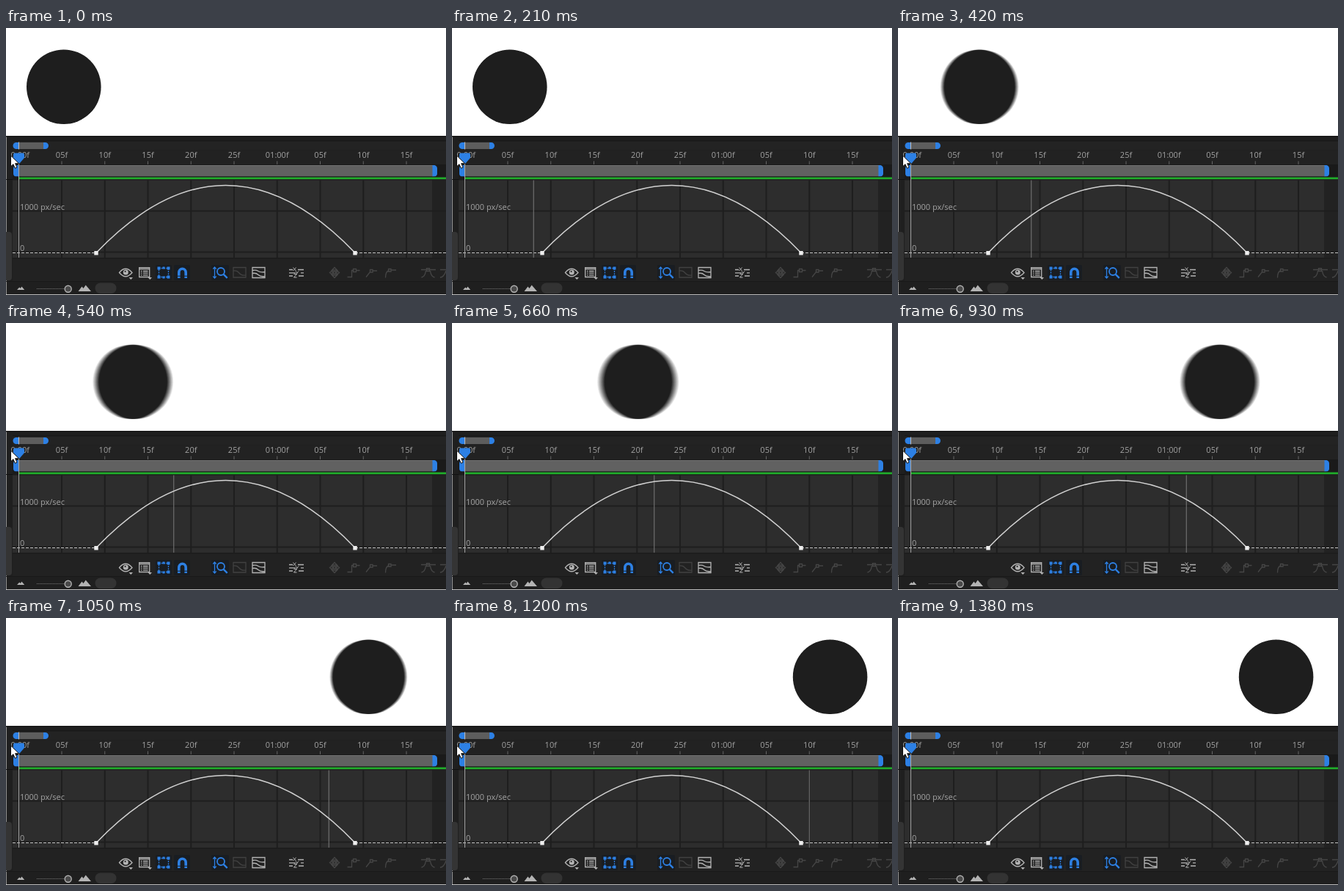
These frames come from a looping animation (600x364 px, 1.44 s). An HTML page with a canvas:

```html
<!DOCTYPE html>
<html lang="en">
<head>
<meta charset="utf-8">
<title>Speed graph</title>
<style>
html, body { margin: 0; width: 100%; height: 100%; overflow: hidden; background: #fff; }
canvas, svg { position: absolute; left: 0; top: 0; display: block; }
text { font: 11px "Open Sans", "Noto Sans", sans-serif; fill: #a3a3a3; }
.line { fill: none; stroke: #b4b4b4; stroke-width: 1.3; }
.blue { fill: #2d80e4; }
.on { stroke: #2d80e4; }
.dim { stroke: #414141; }
.btn { fill: #191d22; }
</style>
</head>
<body>
<canvas id="ball" width="600" height="147"></canvas>
<svg width="600" height="364" viewBox="0 0 600 364">
  <rect x=".5" y="147" width="600" height="216.3" fill="#1f1f1f"/>
  <rect y="147" width="600" height="1.5" fill="#171717"/>
  <rect x="9" y="153" width="591" height="1.5" fill="#181818"/>
  <rect x="9" y="154.5" width="591" height="12" fill="#232323"/>

  <!-- navigator -->
  <rect x="16" y="156" width="36" height="9" fill="#5d5d5d"/>
  <path class="blue" d="M17 156v9h-3a4.5 4.5 0 0 1 0-9zM51 156v9h2.5a4.5 4.5 0 0 0 0-9z"/>
  <path d="M17.5 155.500v10" stroke="#bbb"/>

  <!-- ruler and work area -->
  <rect x="9" y="166.500" width="591" height="20" fill="#222"/>
  <g id="ruler"></g>
  <rect x="9" y="186" width="591" height="17.500" fill="#1a1a1a"/>
  <rect x="16" y="187" width="567" height="15.500" fill="#616161"/>
  <path d="M17 187.500h565" stroke="#727272"/>
  <path class="blue" d="M17 187v15.500h-4q-3-1-3-4v-7q0-3.500 3-4.500zM581.500 187v15.500h3q3.500-1 3.500-4v-7q0-3.500-3.500-4.500z"/>
  <rect x="9" y="202.500" width="591" height="5" fill="#1b1b1b"/>
  <rect x="17" y="203.500" width="583" height="2.700" fill="#20ad2b"/>

  <!-- graph -->
  <rect x="9" y="207.500" width="572" height="106" fill="#2d2d2d"/>
  <rect x="581" y="207.500" width="19" height="106" fill="#222"/>
  <path id="grid" stroke="#1e1e1e" stroke-width="2"/>
  <text x="19" y="247.500">1000 px/sec</text>
  <text x="19" y="303.500">0</text>
  <path d="M9 306.500H123M476 306.500H600" stroke="#c4c4c4" stroke-width="1.100" stroke-dasharray="4 2"/>
  <path id="head" d="M0 207.500V313.500" stroke="#747474" stroke-width="1.100"/>
  <path d="M123 306.500Q299.500 122.500 476 306.500" fill="none" stroke="#d2d2d2" stroke-width="1.500"/>
  <path d="M120.300 304h5.400v5.400h-5.400zM473.300 304h5.400v5.400h-5.400z" fill="#eee"/>
  <path d="M17.500 185V313.500" stroke="#a8a8a8"/>
  <path class="blue" d="M12 170.500h11q2 0 2 2v4.500l-6 7q-1.500 1.500-3 0l-6-7v-4.500q0-2 2-2z"/>
  <path d="M6.500 174v14.800l3.400-3.100 2.400 5.500 2.700-1.200-2.400-5.300h4.900z" fill="#fff" stroke="#111" stroke-width="1"/>
  <path d="M0 206.500H9" stroke="#111"/>
  <path d="M0 278h4q4 0 4 4v58q0 4-4 4h-4z" fill="#343434"/>

  <!-- toolbar -->
  <rect x="9" y="313.500" width="591" height="31.500" fill="#222"/>
  <path d="M9 314H600M0 345.500H600" stroke="#191919"/>
  <path d="M154.500 333.500q8.500-10.500 17.500 0q-9 10.500-17.500 0z" class="line" stroke-width="1.600"/>
  <circle cx="163.300" cy="333" r="3.500" fill="#b4b4b4"/>
  <circle cx="162.600" cy="332" r="1.100" fill="#222"/>
  <path d="M167.500 340h5.500l-2.750 3zM193.500 340h5.500l-2.750 3z" fill="#b4b4b4"/>
  <path class="line" d="M181.700 326.700h14v12.800h-14zM181.700 328.500h14"/>
  <path class="line" d="M184 331.500h1.500M187 331.500h6.500M184 334.200h1.500M187 334.200h6.500M184 336.900h1.500M187 336.900h6.500"/>

  <rect class="btn" x="204" y="323" width="22" height="21" rx="2"/>
  <path class="line on" d="M208.500 327.500h13v12h-13z" stroke-dasharray="2 1.300"/>
  <path class="blue" d="M206.500 325.500h4v4h-4zM219.500 325.500h4v4h-4zM206.500 337.500h4v4h-4zM219.500 337.500h4v4h-4zM213.500 325.500h3v3h-3zM213.500 338.500h3v3h-3z"/>
  <rect class="btn" x="229" y="323" width="22" height="21" rx="2"/>
  <path class="line on" style="stroke-width:3.600" d="M235.800 341v-7.500a4.700 5.200 0 0 1 9.400 0v7.500"/>
  <path d="M233 338.200h5.500M242.500 338.200h5.500" stroke="#191d22"/>

  <rect class="btn" x="280" y="323" width="24" height="21" rx="2"/>
  <path class="line on" d="M284.500 326v15M282.300 328.500l2.200-2.500 2.200 2.500M282.300 338.500l2.200 2.500 2.200-2.500"/>
  <circle class="line on" style="stroke-width:1.800" cx="293" cy="332" r="5"/>
  <path class="line on" style="stroke-width:2.400" d="M296.700 335.800l5 5"/>
  <path class="line dim" d="M310 326.500h17v13.500h-17zM310 331q5-1 8 3t9 3"/>
  <path class="line" d="M336 326.500h17v14h-17zM336 330.500q5-1 8 1t9 1M336 334.500q5-1 8 2t9 2"/>
  <path class="line" d="M386 329.500h5M398 329.500h8M386 333.800h9M402 333.800h4M386 338h5M399 338h7"/>
  <path class="line" style="stroke-width:1" d="M391.500 326.500l4 4.500M395.500 326.500l-4 4.500M395 331.500l2 2.500 2-2.500M397 334l-1.500 2M392.500 335.500h4l-4 4.500h4"/>

  <g class="line dim" style="stroke:#464646">
    <path d="M448 326.500l3.500 3.500h-7zM448 340.500l3.500-3.500h-7zM441.500 333.500l3.500-3v6zM454.500 333.500l-3.500-3v6zM446.500 332h3v3h-3z"/>
    <path d="M465.500 339.500h6v-9h3M473.500 328.500h4v4h-4zM477.500 330.500h5"/>
    <path d="M491 339.500l6-7.500M496.500 329.500h3.500v3.500h-3.500zM500 331h6"/>
    <path d="M517.500 340.500q0-9 5-10M521.500 328.500h3.500v3.500h-3.500zM525 330h7"/>
    <path d="M566.500 340q5-1 6-9M584.500 340q-5-1-6-9M566 329.500h20M573.500 327.700h4v4h-4z"/>
    <path d="M592 340q5 0 8-9M592 329.500h8"/>
  </g>

  <!-- zoom strip -->
  <path d="M15 357l3.300-3.600 1.500 1.500 1.600-2.400 3.800 4.500zM98.500 359l5-6.500 2 2.500 3.200-4.500 7.300 8.500z" fill="#b4b4b4"/>
  <path d="M42 355.500H80" stroke="#777" stroke-dasharray="1 1"/>
  <circle cx="84.700" cy="355.800" r="4.500" fill="#4a4a4a" stroke="#b4b4b4" stroke-width="1.400"/>
  <rect x="121.500" y="347.500" width="29" height="14.500" rx="7.200" fill="#333"/>
</svg>
<script>
const STEP = 30, COUNT = 48, FRAME_W = 11.75, LEFT = 17.25;
const SAMPLES = 15, SHUTTER = 0.5;
const $ = id => document.getElementById(id);
const ctx = $('ball').getContext('2d');
const head = $('head');

function buildRuler() {
  let marks = '', grid = 'M9 249.5H600M9 305.5H600';
  for (let f = 0; f <= 50; f += 5) {
    const x = LEFT + f * FRAME_W;
    const label = f % 30 ? String(f % 30).padStart(2, '0') + 'f' : f ? '01:00f' : '0:00f';
    const labelX = f ? x : x + 2;
    const shown = f === 50 ? '20f' : label;
    marks += `<text x="${f === 50 ? x + 4 : labelX}" y="177.3" text-anchor="middle">${shown}</text>` +
      `<path d="M${x} 181.500v4.500" stroke="#666"/>`;
    if (f < 50) grid += `M${x} 207.5V313.5`;
  }
  $('ruler').innerHTML = marks;
  $('grid').setAttribute('d', grid);
}

// The ball travels between frames 9 and 39 with a parabolic speed curve.
function ballX(f) {
  const u = Math.min(1, Math.max(0, (f - 9) / 30));
  return 78.8 + 436.8 * u * u * (3 - 2 * u);
}

function drawBall(f) {
  ctx.clearRect(0, 0, 600, 147);
  ctx.globalCompositeOperation = 'lighter';
  ctx.globalAlpha = 1 / SAMPLES;
  ctx.fillStyle = '#1e1e1e';
  for (let i = 0; i < SAMPLES; i++) {
    const offset = ((i + 0.5) / SAMPLES - 0.5) * SHUTTER;
    ctx.beginPath();
    ctx.arc(ballX(f + offset), 80.2, 50.8, 0, Math.PI * 2);
    ctx.fill();
  }
}

let last = -1;
function tick(now) {
  const f = Math.min(46, Math.floor((now - start) / STEP + 1e-6) % COUNT);
  if (f !== last && f >= 0) {
    last = f;
    drawBall(f);
    // The preview line advances two frames at a time.
    const x = LEFT + 2 * Math.ceil(f / 2) * FRAME_W;
    head.setAttribute('transform', `translate(${x} 0)`);
    head.style.visibility = f > 0 && f < 46 ? 'visible' : 'hidden';
  }
  requestAnimationFrame(tick);
}

buildRuler();
const start = performance.now();
tick(start);
</script>
</body>
</html>
```
